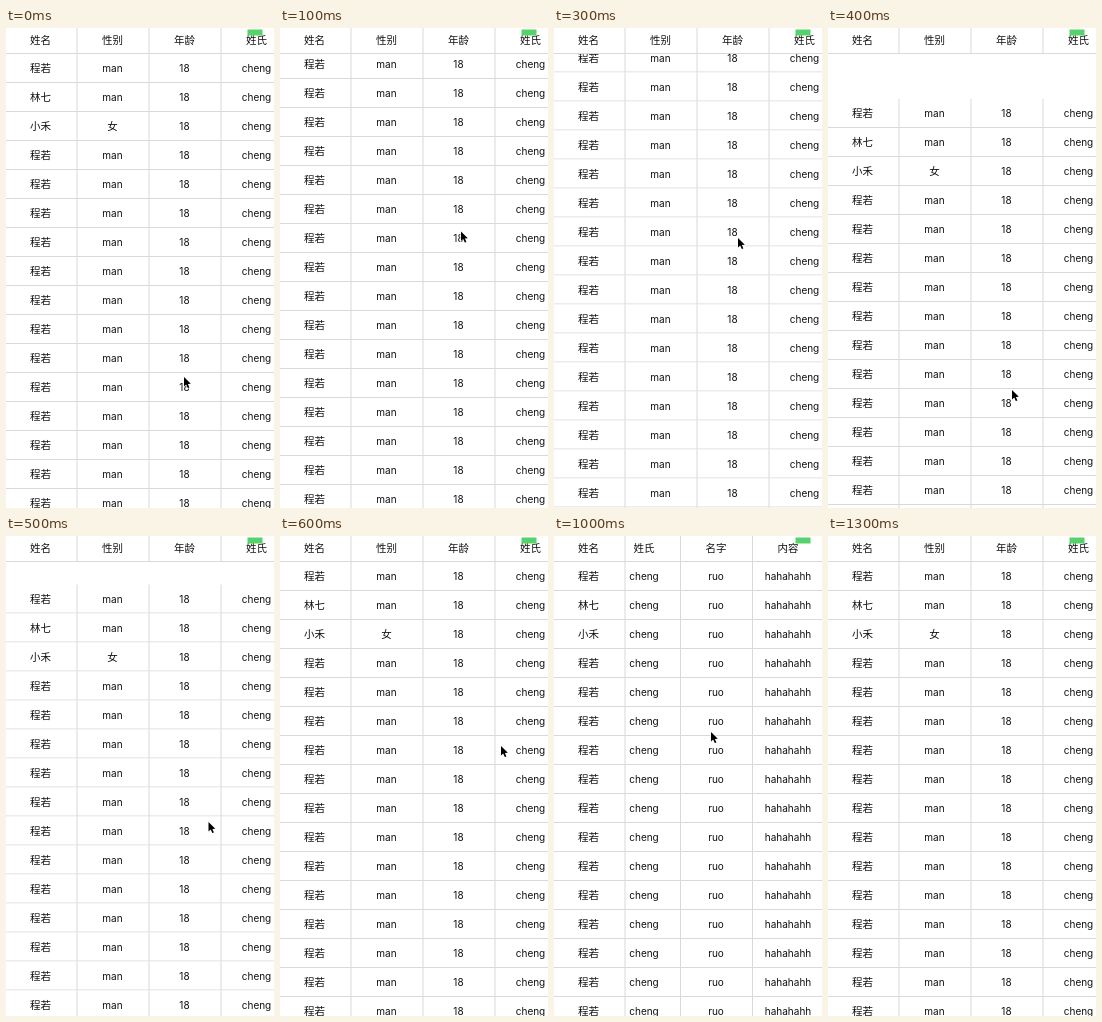
Write an HTML page with a canvas that moves like this. It is 268 px wide and 480 px high and loops after 2000 ms.

```html
<!DOCTYPE html>
<html lang="zh-CN">
<head>
<meta charset="utf-8">
<title>Table with fixed header and first column</title>
<style>
html, body { margin: 0; width: 100%; height: 100%; overflow: hidden; background: #fff; }
canvas { display: block; width: 268px; height: 480px; }
</style>
</head>
<body>
<canvas id="stage"></canvas>
<script>
const W = 268, H = 480, LOOP = 2000, STEP = 100, SWIPE = 200;
const COL = 72, ROW = 29, HEAD = 26;
const canvas = document.getElementById('stage');
const ctx = canvas.getContext('2d');
const dpr = window.devicePixelRatio || 1;
canvas.width = W * dpr;
canvas.height = H * dpr;
ctx.scale(dpr, dpr);

const titles = ['姓名', '性别', '年龄', '姓氏', '名字', '内容'];
const people = ['程若', '林七', '小禾'];
const rows = Array.from({ length: 40 }, (_, i) => [
  people[i] || people[0], i === 2 ? '女' : 'man', '18', 'cheng', 'ruo', 'hahahahh'
]);

// Where the pointer turns, one swipe apart.
const turns = [[178, 349], [184, 58], [184, 362], [221, 210], [6, 202], [157, 196], [255, 196]];
const arrow = new Path2D('M0 0V9.5L2.2 7.5L3.8 11.1L5.4 10.4L3.9 6.9L6.8 6.8Z');

// Progress 0..1 of the n-th swipe, with soft start and end.
function swipe(t, n) {
  const p = Math.min(1, Math.max(0, t / SWIPE - n));
  return p * p * (3 - 2 * p);
}

function cell(text, x, y, h, baseline) {
  ctx.fillStyle = '#fff';
  ctx.fillRect(x, y, COL, h);
  ctx.fillStyle = '#d9d9d9';
  ctx.fillRect(x + COL - 0.5, y, 1, h);
  ctx.fillRect(x, y + h - 1, COL, 1);
  ctx.fillStyle = '#111';
  ctx.font = /[a-z0-9]/.test(text)
    ? '10px Inter, sans-serif'
    : '10.5px "Noto Sans CJK SC", "Noto Sans CJK", sans-serif';
  ctx.fillText(text, x + (COL - 1) / 2, y + baseline);
}

function pointer(t) {
  const [x, y] = [0, 1].map(k => turns.reduce((v, turn, i) =>
    i ? v + (turn[k] - turns[i - 1][k]) * swipe(t, i - 1) : turn[k], 0));
  ctx.save();
  ctx.translate(x, y);
  ctx.lineWidth = 1.4;
  ctx.strokeStyle = '#fff';
  ctx.stroke(arrow);
  ctx.fillStyle = '#000';
  ctx.fill(arrow);
  ctx.restore();
}

function draw(t) {
  // Up, down past the top, spring back; then left, settle, right.
  const sy = 298 * swipe(t, 0) - 343 * swipe(t, 1) + 45 * swipe(t, 2);
  const sx = 162 * swipe(t, 3) - 1.5 * swipe(t, 4) - 160.5 * swipe(t, 5);
  const left = c => c ? c * COL - 1 - sx : -1;

  ctx.fillStyle = '#fff';
  ctx.fillRect(0, 0, W, H);
  ctx.textAlign = 'center';
  // Fixed parts come last so they cover what scrolls beneath.
  for (let c = 5; c >= 0; c--) {
    rows.forEach((row, r) => cell(row[c], left(c), HEAD + r * ROW - sy, ROW, 18.2));
  }
  for (let c = 5; c >= 0; c--) cell(titles[c], left(c), 0, HEAD, 15.5);

  ctx.fillStyle = '#56d16b';
  ctx.fillRect(241.5, 1.5, 15, 6);
  if (t < 1300) pointer(t);
}

const start = performance.now();
function tick() {
  const t = (performance.now() - start) % LOOP;
  draw(Math.floor(t / STEP) * STEP);
  requestAnimationFrame(tick);
}
tick();
</script>
</body>
</html>
```
